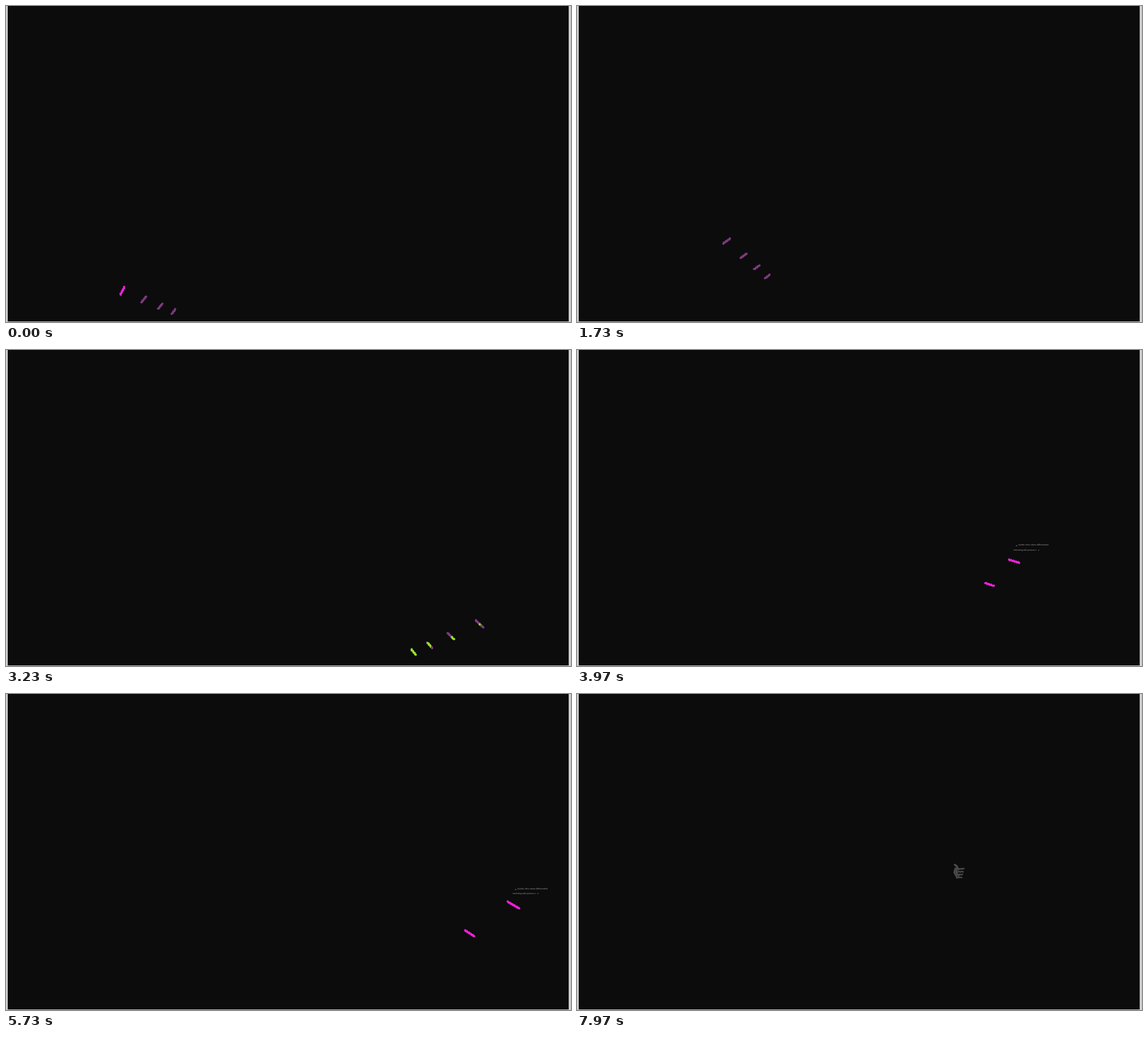
These frames come from a looping animation (967 px wide and 540 px high, 8 s). An HTML page with a canvas:

```html
<!DOCTYPE html>
<html lang="en">
<head>
<meta charset="utf-8">
<title>Sweep</title>
<style>
html, body { margin: 0; width: 100%; height: 100%; overflow: hidden; background: #cdcdcd; }
canvas { display: block; width: 967px; height: 540px; }
</style>
</head>
<body>
<canvas id="stage" width="967" height="540"></canvas>
<script>
const ctx = document.getElementById('stage').getContext('2d');
const LOOP = 8000, STEP = 1000 / 30, STEPS = 240;
const HUB = { x: 490, y: 605 };
const MAGENTA = '#ee22d8', PURPLE = '#7d3a7f', GREEN = '#9be22c', GRAY = '#4b4b4b';
const LATE = 103; // step from which the gray parts replace the inner ticks

const rad = deg => deg * Math.PI / 180;
const clamp = (v, lo, hi) => Math.min(hi, Math.max(lo, v));

// Piecewise linear value at step j; keys are [step, value] pairs.
function track(keys, j) {
  let i = 1;
  while (i < keys.length - 1 && j > keys[i][0]) i++;
  const [a, va] = keys[i - 1], [b, vb] = keys[i];
  return va + (vb - va) * (j - a) / (b - a);
}

// Sweeps completed, and distance of the outermost tick from the hub.
const TURNS = [[0, 0], [52, 2.13], [97, 3.929], [172, 6.862], [208, 8.42], [239, 9.664]];
const REACH = [[0, 314], [97, 350], [172, 470]];

function polar(dist, deg) {
  return { x: HUB.x + dist * Math.cos(rad(deg)), y: HUB.y - dist * Math.sin(rad(deg)) };
}

function line(points, color, width) {
  ctx.strokeStyle = color;
  ctx.lineWidth = width;
  ctx.beginPath();
  points.forEach(([x, y]) => ctx.lineTo(x, y));
  ctx.stroke();
}

// A rough dash made of overlapping dots.
function dash(x, y, length, deg, width, colorAt) {
  const n = Math.max(5, Math.round(length / 1.6));
  const c = Math.cos(rad(deg)), s = Math.sin(rad(deg));
  for (let i = 0; i <= n; i++) {
    const u = i / n, along = (u - 0.5) * length;
    const wob = Math.sin(i * 2.4 + length) * 0.6;
    ctx.fillStyle = colorAt(u);
    ctx.beginPath();
    ctx.arc(x + c * along - s * wob, y + s * along + c * wob, width / 2, 0, 7);
    ctx.fill();
  }
}

// The direction of a sweep, with its height above the horizon.
function ray(j) {
  const theta = 157.85 - 145 * (track(TURNS, j) % 1);
  const right = theta < 90, rise = right ? theta : 180 - theta;
  const reach = track(REACH, j) * (1 - 0.25 * (Math.sin(rad(rise)) - 0.376));
  return { theta, right, rise, reach };
}

function ticks(j, { theta, right, rise, reach }) {
  const late = j >= LATE, lime = right && j > 77 && !late;
  const gap = (45.7 + clamp((j - 52) * 0.14, 0, 9)) * 1e-5;
  const lowest = late ? 454 - Math.max(0, j - 172) : 529;
  for (let i = 0; i < (late ? 2 : 4); i++) {
    const dist = 1 / (1 / reach + i * gap), p = polar(dist, theta);
    if (p.y > lowest) continue;
    const lead = i === 0 && j < 40;
    const flat = right ? 43 - 1.3 * (rise - 23) + i * 2.5 : 50 - 0.82 * (rise - 22) + i;
    const tilt = Math.max(0, flat + (lead && !right ? 12 : 0));
    const base = late || lead ? MAGENTA : PURPLE;
    const share = 0.2 + 0.27 * i, from = (1 - share) * ((0.6 + 0.45 * i) % 1.4);
    const colorAt = u => lime && u >= from && u <= from + share ? GREEN : base;
    dash(p.x, p.y, dist * (right ? 0.051 : 0.046), right ? tilt : -tilt, 3.8, colorAt);
  }
}

function caption({ theta, right, reach }) {
  const p = polar(reach, theta);
  const x = p.x + (right ? 7 : -60), y = p.y - 27;
  ctx.fillStyle = '#9a9a9a';
  ctx.font = '3.4px "Liberation Sans", sans-serif';
  ctx.fillText('number other values differentiated', x, y);
  ctx.fillText('interesting with previous n   a', x - 8, y + 8.7);
  ctx.fillRect(x - 4, y, 2, 1);
}

// Two curved stacks of short marks.
function looseFigure(x, y) {
  for (let i = 0; i < 8; i++) {
    if (i === 3) continue;
    const u = i / 7, dx = -1 - 10 * clamp(u * 1.7 - 0.3, 0, 1);
    dash(x + dx, y - 17 + 34 * u, 4, 12 * Math.sin(i * 2), 2.2, () => GRAY);
  }
  for (let i = 0; i < 5; i++) {
    dash(x + 10 + 2 * Math.sin(i * 2), y - 15 + i * 3.2, 4, 35 + 25 * Math.sin(i * 3), 2.2, () => GRAY);
  }
  dash(x - 7, y + 17, 10, 3, 2.2, () => GRAY);
  dash(x, y + 17.5, 1.5, 0, 2, () => '#aaaaaa');
}

// A bent spine with four bars reaching right.
function handFigure(x, y) {
  line([[x - 7, y - 11], [x - 4, y - 9], [x - 1, y - 3]], GRAY, 3.4);
  for (let k = 0; k < 2; k++) {
    const sx = x + k * 3;
    line([[sx - 6, y - 5], [sx - 8, y + 2], [sx - 3, y + 11 - k * 3]], GRAY, 2.8);
  }
  for (let i = 0; i < 4; i++) {
    dash(x + 2.5 - i * 0.6, y - 4 + i * 4.9, 12 - i * 1.2, -2, 2.5, () => GRAY);
  }
}

// Three ruled lines above a square and a column of dots.
function ruledFigure(x, y) {
  for (let i = 0; i < 3; i++) {
    const left = x - 13 + 2 * Math.sin(2.2 * i - 1.3), top = y + i * 11.5;
    line([[left, top], [left + 27, top + 0.5]], '#565656', 2);
  }
  ctx.fillStyle = '#c4c4c4';
  for (let i = 0; i < 4; i++) {
    ctx.fillRect(x - 7 + 7 * (i % 2), y + 48 + 9 * (i >> 1), 2.2, 2.2);
    ctx.fillRect(x + 14 + i * 0.5, y + 41 + i * 9.9, 2.2, 2);
  }
}

function grayParts(j, { theta, right, rise }) {
  if (theta > 75 && theta < 125) {
    const p = polar(599.5 + (j - 208) * 1.11, theta);
    ruledFigure(p.x, p.y);
  } else if (right && rise > 45) {
    const p = polar(325.2 + (j - 142) * 0.19, theta);
    (j < 180 ? looseFigure : handFigure)(p.x, p.y);
  }
}

function draw(time) {
  const j = Math.floor((time + 4) / STEP) % STEPS;
  const beam = ray(j), side = beam.rise <= 45;

  ctx.fillStyle = '#cdcdcd';
  ctx.fillRect(0, 0, 967, 540);
  ctx.fillStyle = '#0c0c0c';
  ctx.fillRect(3, 0, 960, 539);
  ctx.fillStyle = '#000';
  ctx.fillRect(3, 538, 960, 1);

  ctx.save();
  ctx.beginPath();
  ctx.rect(3, 0, 960, 538);
  ctx.clip();
  ctx.lineCap = ctx.lineJoin = 'round';
  if (j < LATE || side) ticks(j, beam);
  if (side && j >= (beam.right ? LATE : 78)) caption(beam);
  if (j >= LATE) grayParts(j, beam);
  ctx.restore();
}

const began = performance.now();
function tick() {
  draw((performance.now() - began) % LOOP);
  requestAnimationFrame(tick);
}
tick();
</script>
</body>
</html>
```
